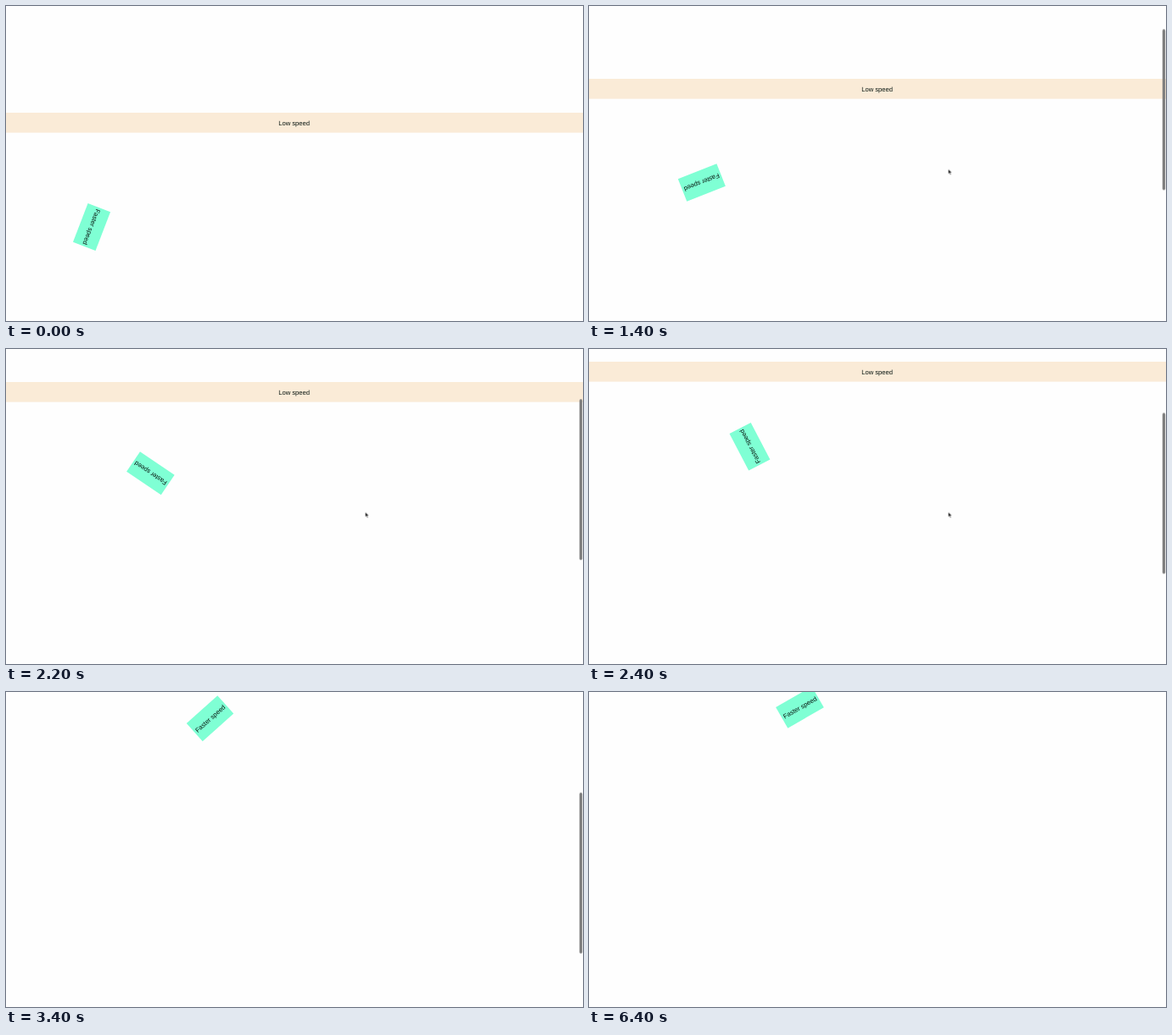
These frames come from a looping animation (680x372 px, 7.1 s). An HTML page:

```html
<!DOCTYPE html>
<html lang="en">
<head>
<meta charset="utf-8">
<title>Scroll speeds</title>
<style>
  /* scroll distance of the bar, in px; everything that scrolls derives from it */
  @property --s { syntax: "<number>"; inherits: true; initial-value: 0; }

  html, body { margin: 0; width: 100%; height: 100%; overflow: hidden; background: #fefefe; }

  svg {
    display: block;
    width: 680px;
    height: 372px;
    animation: scroll 7100ms infinite;
  }
  text {
    font: 7.6px "Liberation Sans", Arial, sans-serif;
    text-anchor: middle;
    text-rendering: geometricPrecision;
    fill: #06140f;
  }

  .bar { transform: translateY(calc(126px - var(--s) * 1px)); }
  .box {
    transform:
      translate(calc(101px + var(--s) * .797px), calc(261px - var(--s) * 1.313px))
      rotate(calc(111deg + var(--s) * 1.184deg));
  }
  .thumb {
    transform: translateY(calc(.3px + var(--s) * .677px));
    animation: thumb 7100ms infinite;
  }
  .cursor { animation: move 7100ms infinite, blink 7100ms step-end infinite; }

  /* 100 ms is 1.408% of the loop; each step lasts 100 ms */
  @keyframes scroll {
    0%     { --s: 0; animation-timing-function: step-end; }
    12.67% { --s: 4.5; animation-timing-function: steps(5); }
    19.71% { --s: 40; animation-timing-function: steps(8); }
    30.98% { --s: 87; animation-timing-function: steps(2); }
    33.8%  { --s: 111; animation-timing-function: steps(4); }
    39.43% { --s: 135.5; animation-timing-function: steps(4); }
    45.07% { --s: 165; animation-timing-function: steps(4); }
    50.7%, 100% { --s: 185; }
  }
  @keyframes thumb {
    0%     { opacity: 0; animation-timing-function: step-end; }
    12.67% { opacity: 1; animation-timing-function: step-end; }
    53.52% { opacity: 1; animation-timing-function: steps(6); }
    61.97%, 100% { opacity: 0; }
  }
  @keyframes move {
    0%     { transform: translate(428px, 193px); animation-timing-function: step-end; }
    5.63%  { transform: translate(423.5px, 192.7px); animation-timing-function: step-end; }
    53.52% { transform: translate(423.5px, 192.7px); animation-timing-function: steps(6); }
    61.97%, 100% { transform: translate(597.5px, -.8px); }
  }
  @keyframes blink {
    0%     { opacity: 0; }
    4.22%  { opacity: 1; }
    35.21% { opacity: 0; }
    54.92% { opacity: 1; }
    90.14%, 100% { opacity: 0; }
  }
</style>
</head>
<body>
<svg viewBox="0 0 680 372">
  <g class="bar">
    <rect width="680" height="23.6" fill="#faebd7"/>
    <text x="339.6" y="14.8">Low speed</text>
  </g>
  <g class="box">
    <rect x="-24.5" y="-14.2" width="49" height="28.4" fill="#7fffd4"/>
    <text y="2.9">Faster speed</text>
  </g>
  <rect class="thumb" x="675.8" width="3.4" height="190" rx="1.7" fill="#7f7f7f"/>
  <path class="cursor" d="M0 0V5.4L1.3 4.3L2.2 6.4L3.2 6L2.3 4H4Z"
        fill="#111" stroke="#fff" stroke-width=".4"/>
</svg>
</body>
</html>
```
